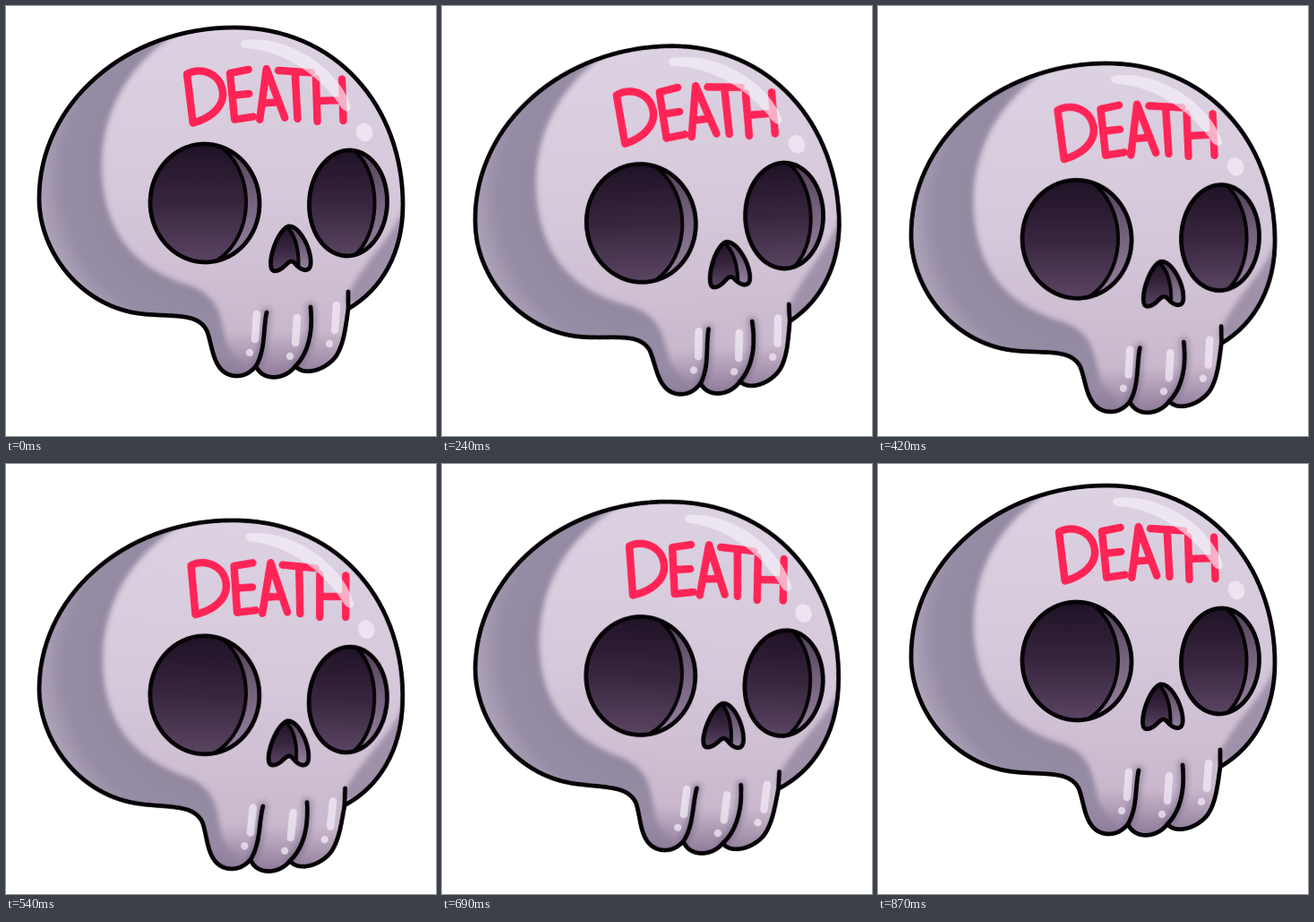
These frames come from a looping animation (480 by 480 pixels, 0.9 s). An HTML page with a canvas:

```html
<!DOCTYPE html>
<html lang="en">
<head>
<meta charset="utf-8">
<title>Skull</title>
<style>
html, body { margin: 0; width: 100%; height: 100%; overflow: hidden; background: #fff; }
canvas { display: block; width: 100vw; height: 100vh; }
</style>
</head>
<body>
<canvas id="stage" width="480" height="480"></canvas>
<script>
const SIZE = 480, SCALE = 2, LOOP = 900, STEP = 30;
const INK = '#050306', RED = '#ff2456', SHINE = 'rgba(246,241,250,.68)';
const stage = document.getElementById('stage').getContext('2d');

// The skull is painted once, then moved as a whole.
const sprite = document.createElement('canvas');
sprite.width = sprite.height = SIZE * SCALE;
const g = sprite.getContext('2d');
g.scale(SCALE, SCALE);
g.lineCap = g.lineJoin = 'round';

const shape = d => new Path2D(d);

function oval(x, y, rx, ry, turn = 0) {
  const path = new Path2D();
  path.ellipse(x, y, rx, ry, turn, 0, Math.PI * 2);
  return path;
}

function blend(gradient, colors) {
  colors.forEach((color, i) => gradient.addColorStop(i / (colors.length - 1), color));
  return gradient;
}
const downward = (y0, y1, ...colors) => blend(g.createLinearGradient(0, y0, 0, y1), colors);

function blurred(radius, draw) {
  g.filter = `blur(${radius * SCALE}px)`;
  draw();
  g.filter = 'none';
}

function fill(path, color) {
  g.fillStyle = color;
  g.fill(path);
}

function line(path, color = INK, width = 4.8) {
  g.strokeStyle = color;
  g.lineWidth = width;
  g.stroke(path);
}

function within(path, draw) {
  g.save();
  g.clip(path);
  draw();
  g.restore();
}

function drawHead() {
  const cranium = 'M382 338C420 316 443 275 443 222C443 112 368 24 255 24' +
    'C135 24 37 108 37 215C37 275 85 338 155 344';
  const jaw = 'C190 347 214 343 224 362C231 378 230 413 258 413C267 413 274 408 279 402';
  const teeth = 'C287 420 312 417 323 402C333 414 358 406 369 390C377 377 379 360 382 338Z';
  const head = shape(cranium + jaw + teeth);
  const gaps = ['M291 342C287 358 290 384 279 402', 'M340 336C343 365 337 388 323 402'].map(shape);
  const side = shape('M215 15C140 55 105 115 107 185C110 260 150 295 205 312' +
    'C240 325 240 350 246 375C252 395 270 395 280 430H0V15Z');
  const edge = shape('M450 205C440 255 400 280 378 330L460 345Z');

  within(head, () => {
    fill(head, downward(30, 400, '#dcd2e2', '#d5c8da', '#c7b5ca'));
    const sideTone = blend(g.createRadialGradient(240, 190, 130, 240, 190, 225),
      ['#9288a0', '#978ca5', '#beb5c8']);
    blurred(3, () => {
      fill(side, sideTone);
      fill(edge, '#a091aa');
      gaps.forEach(gap => line(gap, 'rgba(112,92,128,.4)', 12));
    });
    g.fillStyle = downward(362, 414, 'rgba(112,92,128,0)', 'rgba(105,84,121,.6)');
    g.fillRect(215, 355, 180, 65);
  });

  line(head);
  gaps.forEach(gap => line(gap));
  line(shape('M382 319V338'));
}

// An opening whose dark hollow leaves a lighter rim on its right.
function drawOpening(outline, hollow, top, bottom) {
  within(outline, () => {
    fill(outline, downward(top, bottom, '#524059', '#77647f', '#9684a0'));
    fill(hollow, downward(top, bottom, '#1f1226', '#38263f', '#5b4663'));
    line(hollow, INK, 4);
  });
  line(outline);
}

function drawFace() {
  drawOpening(oval(222, 220, 61, 66, -.06), oval(208, 219, 60, 73), 153, 287);
  drawOpening(oval(382, 220, 43.5, 59, .05), oval(369, 220, 42.5, 66), 160, 280);
  drawOpening(
    shape('M296 292C293 280 304 250 315 246C327 244 342 272 340 289' +
      'C338 299 328 294 323 288C318 281 314 288 309 292C304 296 297 298 296 292Z'),
    shape('M312 245C324 256 328 275 326 298H280V245Z'), 246, 296);
}

// Letters on a unit square: glyph, x, y, width, height; each leans a little less.
function drawWord() {
  const letters = [
    ['M0 0V1C.75 .92 1.05 .65 1 .38C.95 .05 .4 -.12 0 0', 202, 76, 37, 55],
    ['M1 -.04L0 0V1L1 .98M0 .48H.9', 250, 75, 21, 52],
    ['M0 1L.42 0L1 1M.13 .68H.82', 279, 71, 28, 56],
    ['M0 0L1 .08M.5 .04V1', 304, 72, 37, 55],
    ['M0 0V1M1 .03V1M0 .52H1', 346, 81, 29, 48],
  ];
  letters.forEach(([glyph, x, y, w, h], i) => {
    const path = new Path2D();
    const place = new DOMMatrix().translate(x, y).rotate(1.3 * i - 7).scale(w, h);
    path.addPath(shape(glyph), place);
    line(path, RED, 8.4);
  });
}

function drawShine() {
  fill(shape('M266 38C315 32 372 70 385 112C385 121 376 118 372 110' +
    'C355 84 315 50 268 47C261 46 260 39 266 38Z'), SHINE);
  fill(oval(400, 141, 9, 10.5, -.4), SHINE);
  for (const [x, y] of [[272, 387], [317, 391], [361, 377]]) {
    line(shape(`M${x + 8} ${y - 43}L${x + 6} ${y - 15}`), SHINE, 8.5);
    fill(oval(x, y, 4.2, 4.2), SHINE);
  }
}

// Phase of a full cycle whose halfway point falls at `mid`; rests on the last step.
function phase(t, mid) {
  const end = LOOP - STEP;
  const half = t < mid ? t / mid : 1 + (t - mid) / (end - mid);
  return Math.PI * Math.min(half, 2);
}

function render(now) {
  const t = Math.floor((now % LOOP) / STEP) * STEP;
  const drop = 20.7 * (1 - Math.cos(phase(t, 475)));
  const tilt = -3 * Math.PI / 180 * Math.sin(phase(t, 450));
  const px = 248, py = 215;
  stage.setTransform(1, 0, 0, 1, 0, 0);
  stage.fillStyle = '#fff';
  stage.fillRect(0, 0, SIZE, SIZE);
  stage.imageSmoothingQuality = 'high';
  stage.translate(px, py + drop);
  stage.rotate(tilt);
  stage.drawImage(sprite, -px, -py, SIZE, SIZE);
}

drawHead();
drawFace();
drawWord();
drawShine();

const start = performance.now();
function tick() {
  render(performance.now() - start);
  requestAnimationFrame(tick);
}
tick();
</script>
</body>
</html>
```
